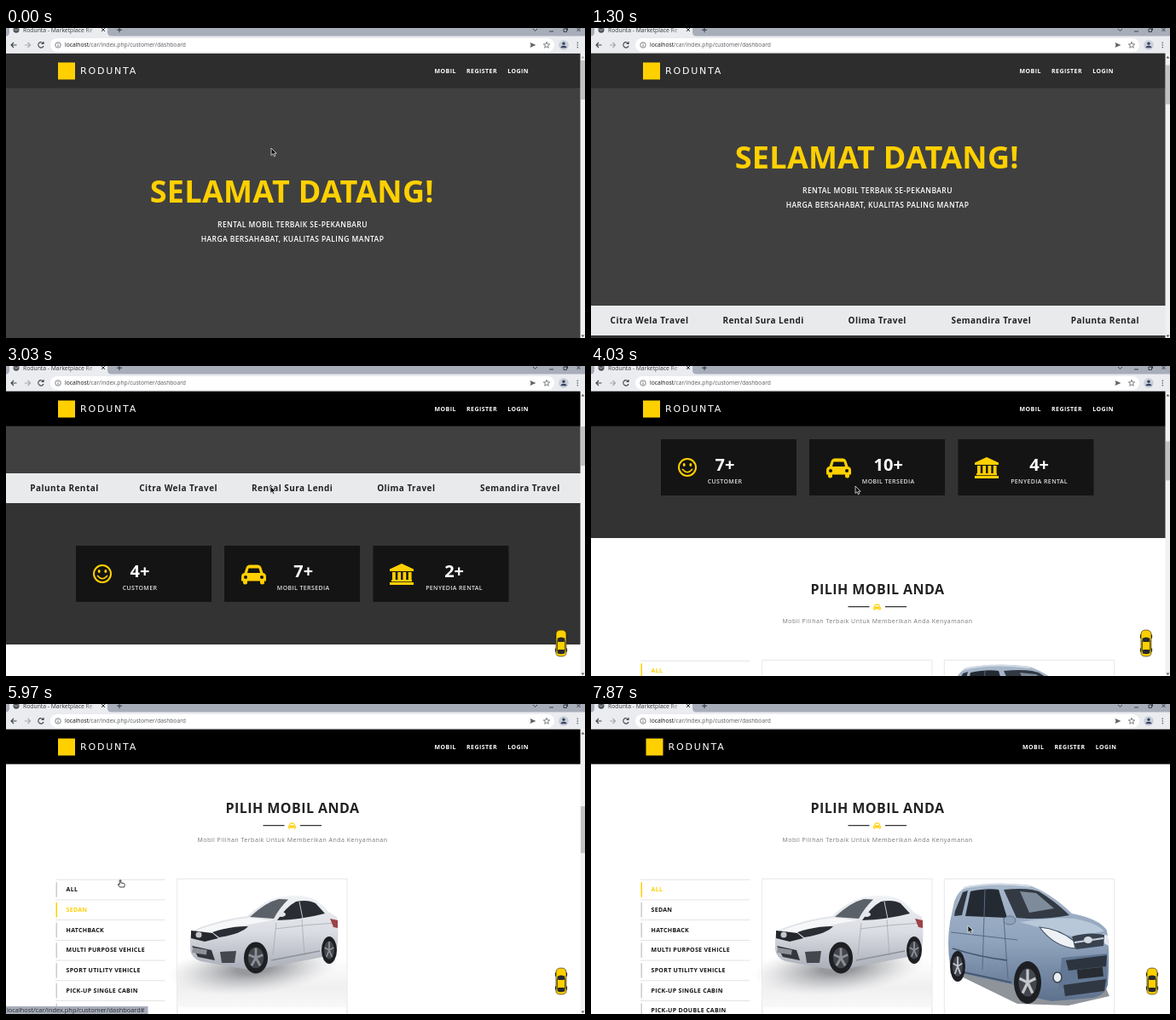
An HTML page that plays this animation: 679x364 px, repeating every 8 s.

```html
<!DOCTYPE html>
<html lang="id">
<head>
<meta charset="utf-8">
<title>Rodunta</title>
<style>
html, body { margin: 0; width: 100%; height: 100%; overflow: hidden; background: #fff; }
svg { display: block; width: 100vw; height: 100vh; }
text { font-family: "Open Sans", "Noto Sans", sans-serif; white-space: pre; }
</style>
</head>
<body>
<svg id="stage" viewBox="0 0 679 364" xmlns="http://www.w3.org/2000/svg"></svg>
<script>
const LOOP = 8000;
const YELLOW = '#ffd000';
const BRAND = 'Rodunta';
const agents = ['Citra Wela Travel', 'Rental Sura Lendi', 'Olima Travel', 'Semandira Travel', 'Palunta Rental'];
const types = ['ALL', 'SEDAN', 'HATCHBACK', 'MULTI PURPOSE VEHICLE', 'SPORT UTILITY VEHICLE', 'PICK-UP SINGLE CABIN', 'PICK-UP DOUBLE CABIN'];
const links = ['', 'localhost/car/index.php/customer/dashboard#',
  'localhost/.../honda-city-generasi-kelima-bermesin-turbo-meng...'];
const PITCH = 133.6;
const ROW = 23.72;

const steps = [
  [0, { scroll: 0, x: 311, y: 141, cursor: 'arrow', head: .3, strip: 0, counts: [0, 0, 0], up: 0,
        thumb: null, mpv: 1, active: 0, link: 0, hover: 0, box: 0, bar: 1 }],
  [800, { x: 310.5 }],
  [930, { x: 310 }],
  [1070, { scroll: 4 }],
  [1130, { scroll: 14 }],
  [1170, { scroll: 25 }],
  [1230, { scroll: 35, cursor: 'beam' }],
  [1300, { scroll: 40 }],
  [2370, { scroll: 137, head: 1, strip: 100, cursor: 'arrow' }],
  [2600, { scroll: 208, strip: PITCH, counts: [3, 4, 1] }],
  [2870, { counts: [3, 6, 2], up: 1 }],
  [3030, { scroll: 240, counts: [4, 7, 2] }],
  [3300, { scroll: 265, counts: [5, 8, 3] }],
  [3570, { strip: PITCH + 6, counts: [6, 9, 3] }],
  [3770, { strip: 2 * PITCH - 2 }],
  [4030, { scroll: 365, strip: 2 * PITCH, counts: [7, 10, 4] }],
  [4230, { scroll: 371 }],
  [4430, { scroll: 430 }],
  [4630, { scroll: 498 }],
  [4830, { scroll: 505 }],
  [5070, { x: 199, y: 224 }],
  [5370, { x: 137, y: 231, cursor: 'hand' }],
  [5630, { x: 135, y: 233, active: 1, link: 1, mpv: .5, thumb: [116, 52] }],
  [5970, { x: 134, y: 207, mpv: 0, thumb: [120, 55] }],
  [6200, { y: 209, mpv: .28, thumb: null }],
  [6500, { x: 142, y: 213, mpv: .9, active: 0 }],
  [6730, { x: 302, y: 258, cursor: 'arrow', mpv: 1, link: 2, hover: .3 }],
  [6930, { x: 310, y: 260, hover: .5 }],
  [7470, { box: 1, bar: 0, link: 0, hover: 0 }],
  [7870, { x: 442, box: 0 }]
];

const rect = (x, y, w, h, fill, more = '') =>
  `<rect x="${x}" y="${y}" width="${w}" height="${h}" fill="${fill}" ${more}/>`;
const path = (d, fill, more = '') => `<path d="${d}" fill="${fill}" ${more}/>`;
const line = (d, color, width, more = '') =>
  `<path d="${d}" fill="none" stroke="${color}" stroke-width="${width}" ${more}/>`;
const oval = (x, y, rx, ry, fill, more = '') =>
  `<ellipse cx="${x}" cy="${y}" rx="${rx}" ry="${ry}" fill="${fill}" ${more}/>`;
const text = (x, y, str, size, fill, { w = 400, ls = 0, mid = 0, more = '' } = {}) =>
  `<text x="${x}" y="${y}" font-size="${size}" fill="${fill}" font-weight="${w}" letter-spacing="${ls}"
    ${mid ? 'text-anchor="middle"' : ''} ${more}>${str}</text>`;
const group = (id, body, more = '') => `<g id="${id}" ${more}>${body}</g>`;
const fade = (id, stops, axis = 'x2="0" y2="1"', kind = 'linear') => `<${kind}Gradient id="${id}" ${axis}>`
  + stops.map(([at, color, alpha = 1]) => `<stop offset="${at}" stop-color="${color}" stop-opacity="${alpha}"/>`).join('')
  + `</${kind}Gradient>`;

function wheel(x, y, rx, ry, rim) {
  let spokes = '';
  for (let i = 0; i < 5; i++) {
    const a = i * Math.PI * .4 - Math.PI / 2;
    spokes += `M${x} ${y}L${x + Math.cos(a) * rx * .62} ${y + Math.sin(a) * ry * .62}`;
  }
  return oval(x, y, rx, ry, '#1d1f23') + oval(x, y, rx * .66, ry * .66, '#43464c') + line(spokes, rim, rx * .2);
}

const carIcon = path('M-14.5 3Q-14.5-1-11-1.500L-9-7.500Q-8-11-4.500-11H4.500Q8-11 9-7.500L11-1.500Q14.500-1 14.500 3V8H12.500V9.500Q12.500 12 10 12T7.500 9.500V8H-7.500V9.500Q-7.500 12-10 12T-12.500 9.500V8H-14.500ZM-7.500-1.500H7.500L6-7H-6ZM-11.500 3.500a2 2 0 1 0 4 0a2 2 0 1 0-4 0M7.500 3.500a2 2 0 1 0 4 0a2 2 0 1 0-4 0', YELLOW, 'fill-rule="evenodd"');

// Car photos, placed as they stand once the page rests at 505.
const sedan = rect(201, 206, 198.5, 150, 'url(#floor)')
  + oval(290, 311, 100, 30, 'url(#shadow)', 'transform="rotate(-5 290 311)"')
  + path('M216 272Q218 265 232 261Q257 252 283 249Q302 231 318 227Q340 223 356 227Q368 231 378 244L388 250Q391 268 388 288L377 296 309 309Q290 314 272 310L228 302Q217 298 216 288Z', 'url(#silver)')
  + path('M222 266Q254 254 285 251L312 254Q275 260 244 269Z', '#f6f7f9')
  + path('M286 250Q304 233 320 229L331 229.500Q321 239 314 252Z', '#5a6169')
  + path('M318 254Q329 238 340 232Q354 229 363 234L374 246Q347 253 318 254Z', '#2a2e34')
  + line('M344 232L348 252', '#c5c8ce', 1)
  + line('M316 264Q350 259 388 257M347 253L350 296M317 257L313 295', '#a6aab3', .8)
  + line('M311 301L368 290', '#8d9199', 1.600)
  + path('M242 268Q262 261 284 261Q276 270 250 274Z', '#2a2d33')
  + path('M217 266L242 269 249 275 233 279 217 275Z', '#24272c')
  + path('M218 284L241 289 245 301 225 297Z', '#33363c')
  + path('M251 291L270 290 268 304 253 304Z', '#44474d')
  + rect(219, 286, 17, 6, '#8e9298', 'transform="rotate(9 219 286)"')
  + oval(226, 271, 3.500, 3.500, '#c3c6ca')
  + path('M380 252L389 254 389 263 384 262Z', '#9b4348')
  + oval(323, 247, 5, 3, '#e3e5e9')
  + wheel(293, 298, 14, 18.500, '#8d9097') + wheel(379, 289, 9, 16, '#8d9097');

const mpv = rect(415, 206, 198, 151, '#fff')
  + path('M424 315L500 352 560 354 608 343 600 325 430 300Z', '#8f949b')
  + path('M421 256L426 232Q430 219 442 214Q478 208 514 213Q538 221 564 246Q596 252 605 266Q609 290 606 330Q602 343 588 345L540 349 522 345 493 329 437 317 421 306Q417 280 421 256Z', 'url(#blue)')
  + path('M484 218Q510 215 525 220Q545 232 561 248Q530 254 499 251Z', '#333a44')
  + path('M503 220L522 222 543 240 514 245Z', '#7d8b9b')
  + path('M445 220Q464 216 478 218L488 251 439 249Z', '#242a32')
  + path('M427 243L436 221 442 219 435 248 426 249Z', '#2e353e')
  + line('M437 216Q470 208 515 214', '#d3dbe5', 2)
  + line('M462 218L459 312M484 251L489 323M422 268L500 277', '#566a86', 1)
  + line('M424 287Q455 297 488 301M437 315L493 327', '#465870', 1.800)
  + path('M503 256Q540 250 566 252Q594 257 602 267L565 273Q538 266 503 256Z', '#b9c8d9')
  + path('M526 262Q549 264 566 278L568 287Q543 285 526 262Z', '#eef2f6', 'stroke="#465364" stroke-width="1.200"')
  + path('M600 270L606 272 607 284 602 281Z', '#e4eaf0')
  + path('M564 273Q584 267 602 271L601 284 569 288Z', '#39424f')
  + line('M567 280L601 275', '#c9d3de', 1.800)
  + oval(583, 277, 5, 4, '#d5dae0')
  + path('M552 298L605 293 605 327 548 335Z', '#627793')
  + path('M557 301L605 295 604 308 560 313Z', '#2c343f')
  + path('M554 330L604 323 602 337 556 343Z', '#2f3843')
  + rect(570, 312, 30, 11, '#272c33', 'transform="rotate(-6 570 312)"')
  + oval(547, 321, 5, 6, '#e8edf2', 'stroke="#3c4755" stroke-width="1.500"')
  + oval(491, 254, 7, 5, '#8da1bb', 'stroke="#536781" stroke-width=".8"')
  + wheel(512, 327, 16, 25, '#c2c6cc') + wheel(430, 308, 9, 18, '#c2c6cc');

const stat = (x, label, i, cx, icon) => rect(x, 451, 159, 66, '#141414') + icon
  + text(cx, 487.5, '', 20, '#fff', { w: 700, mid: 1, more: `id="count${i}"` })
  + text(cx, 502.5, label, 7, '#ddd', { w: 600, ls: .38, mid: 1 });

const smile = `<circle cx="113" cy="484" r="10" fill="none" stroke="${YELLOW}" stroke-width="2"/>`
  + oval(109.2, 481, 1.500, 1.900, YELLOW) + oval(116.8, 481, 1.500, 1.900, YELLOW)
  + line('M107.500 486.500Q113 493 118.500 486.500', YELLOW, 1.700, 'stroke-linecap="round"');
const bank = path('M464 472L478 478.500V481H450V478.500ZM450 494H478V497H450ZM452 491H476V493.200H452Z', YELLOW)
  + [453, 459.3, 465.500, 471.800].map(x => rect(x, 482, 3.800, 9, YELLOW)).join('');

const hero = rect(0, 30, 679, 337, '#404040')
  + text(335.3, 205, 'SELAMAT DATANG!', 36, YELLOW, { w: 700, ls: .3, mid: 1 })
  + text(336, 234, 'RENTAL MOBIL TERBAIK SE-PEKANBARU', 8.5, '#fff', { w: 600, ls: .42, mid: 1 })
  + text(336, 251, 'HARGA BERSAHABAT, KUALITAS PALING MANTAP', 8.5, '#fff', { w: 600, ls: .42, mid: 1 });

let names = '';
for (let i = -3; i < 6; i++)
  names += text(68.5 + PITCH * i, 387, agents[(i + 10) % 5], 10, '#222', { w: 700, ls: .45, mid: 1 });

const stats = rect(0, 401, 679, 166, '#333')
  + stat(82, 'CUSTOMER', 0, 157, smile)
  + stat(256, 'MOBIL TERSEDIA', 1, 348.7, `<g transform="translate(290.500 484.500)">${carIcon}</g>`)
  + stat(430.5, 'PENYEDIA RENTAL', 2, 525.6, bank);

const heading = text(336, 632.7, 'PILIH MOBIL ANDA', 16, '#222', { w: 700, ls: .45, mid: 1 })
  + line('M301.500 647.700H326.500M345 647.700H370', '#333', 1.2)
  + `<g transform="translate(335.500 648) scale(.32)">${carIcon}</g>`
  + text(336, 666.7, 'Mobil Pilihan Terbaik Untuk Memberikan Anda Kenyamanan', 7, '#777', { ls: .5, mid: 1 });

const menu = types.map((name, i) => {
  const y = 710.8 + ROW * i;
  return rect(58, y, 128.500, .8, '#ddd') + rect(58.5, y + 3.500, 1.5, 17.500, '#ccc', `id="mark${i}"`)
    + text(70.5, y + 14.300, name, 7, '#111', { w: 700, ls: .3, more: `id="type${i}"` });
}).join('');

const frame = x => rect(x, 710.5, 199, 240, '#fff', 'stroke="#ebebeb" stroke-width="1.500"');
const lens = `<circle cx="299" cy="785.500" r="3" fill="none" stroke="#fff" stroke-width="1.500"/>`
  + line('M301.300 788L303.800 790.500', '#fff', 1.8) + line('M297.500 785.500H300.500M299 784V787', '#fff', .7);

const page = hero + rect(0, 366, 679, 35, '#e9eaec') + group('strip', names) + stats
  + rect(0, 567, 679, 700, '#fff') + heading + menu
  + frame(200.8) + '<use href="#sedan" y="505"/>'
  + group('hover', rect(201, 711, 199, 150, '#000', 'id="shade"') + lens)
  + group('mpv', frame(414.500) + `<g transform="translate(0 505)">${mpv}</g>`);

const nav = (x, label) => text(x, 53.2, label, 7, '#fff', { w: 700, ls: .45 });
const header = rect(-10, 29, 700, 41.600, '#000', 'id="headBg"')
  + rect(61, 40.5, 20, 20, YELLOW)
  + text(87, 54.3, BRAND.toUpperCase(), 11, '#fff', { ls: 1.8, more: 'style="font-family:\'DejaVu Sans\',sans-serif"' })
  + nav(502.5, 'MOBIL') + nav(540, 'REGISTER') + nav(588.3, 'LOGIN');

const topCar = rect(643.9, 315, 14.2, 5, '#222', 'rx="1.500"') + rect(643.9, 331, 14.2, 5, '#222', 'rx="1.500"')
  + path('M645 315Q645 310 651 310T657 315V337Q657 341 651 341T645 337Z', YELLOW, 'stroke="#3a3210" stroke-width=".7"')
  + path('M646.300 320Q651 317 655.700 320L654.500 324H647.500Z', '#26282c')
  + path('M647.500 333H654.500L655.700 337Q651 339.500 646.300 337Z', '#26282c')
  + line('M646.300 322V335M655.700 322V335', '#26282c', .9);

const bar = rect(673.5, 29, 6, 335, '#f1f1f1') + rect(674, 38, 5, 46, '#c1c1c1', 'id="thumb"')
  + path('M674.600 35.500H678.400L676.300 33Z', '#505050', 'id="arrowUp"') + path('M674.600 360.500H678.400L676.300 363Z', '#505050');

const lightbox = rect(0, 29, 679, 335, '#0b0b0b', 'opacity=".8"')
  + '<use href="#sedan" transform="translate(339.500 197) scale(1.800) translate(-300.250 -281)"/>'
  + line('M508 53L514 59M514 53L508 59', '#333', 1.2);

const TOOLBAR = '#eaecef';
const chrome = rect(0, 0, 679, 12, '#a8adba') + rect(0, 9.5, 679, 20.200, TOOLBAR)
  + path('M0 10Q4 9 4 5V0H119V5Q119 9 123 10Z', TOOLBAR)
  + oval(12, 2, 3.500, 3.800, '#4d5156') + line('M9.500 1.500L12 3L14.500 1', '#c4c7cb', .8)
  + text(20, 4.8, BRAND + ' - Marketplace Re', 6.8, '#35383d')
  + rect(92, 0, 16, 8, 'url(#tabEnd)')
  + line('M112 0L116 4M116 0L112 4M130 2.200H136M133 -1V5.200', '#33363b', 1)
  + line('M618 1L620.500 3.500L623 1M637 4H642M654 1H657.500V4.500H654ZM655.500 0H658.500V3M669.500 0L673.500 4M673.500 0L669.500 4', '#33363b', .9)
  + rect(52, 12, 591, 16, '#fff', 'rx="8"')
  + line('M12.500 20H6M9 17L6 20L9 23', '#3f4348', 1.1)
  + line('M22 20H28.500M25.500 17L28.500 20L25.500 23', '#a5a8ad', 1.1)
  + line('M43.600 18A3.200 3.200 0 1 0 44 21M44 16V18.500H41.500', '#3f4348', 1.1)
  + '<circle cx="61" cy="20" r="3.200" fill="none" stroke="#5f6368" stroke-width=".8"/>'
  + line('M61 19.500V22M61 18V18.800', '#5f6368', .9)
  + text(69, 22.3, 'localhost<tspan fill="#55595e">/car/index.php/customer/dashboard</tspan>', 6.7, '#111')
  + path('M614.500 17L621.500 20L614.500 23L615.500 20Z', '#5f6368')
  + path('M634 16.300L635 18.900L637.700 19L635.600 20.700L636.300 23.300L634 21.800L631.700 23.300L632.400 20.700L630.300 19L633 18.900Z', 'none', 'stroke="#5f6368" stroke-width=".8"')
  + oval(654, 20, 5.800, 5.800, '#c9cedb') + oval(654, 18.300, 1.700, 1.700, '#39425e')
  + path('M650.500 23.300Q650.500 20.700 654 20.700T657.500 23.300Z', '#39425e')
  + [17.3, 20, 22.7].map(y => oval(670.3, y, .8, .8, '#4a4e53')).join('');

const pointers =
  path('M0 0V8.500L2 6.700L3.400 9.800L4.900 9.100L3.500 6.200H6.200Z', '#111', 'id="arrow" stroke="#fff" stroke-width=".7"')
  + line('M-.2 -2H1M1.800 -2H3M1.400 -1.500V6M-.2 6.500H1M1.800 6.500H3', '#262626', .8, 'id="beam"')
  + path('M-.8 0Q0 -.9 .8 0V3L4.500 3.800Q5.500 4.200 5.300 5.500L4.500 8H-.5L-2.800 4.800Q-2.500 3.800 -.8 5Z', '#fff', 'id="hand" stroke="#111" stroke-width=".8"');

const stage = document.getElementById('stage');
stage.innerHTML = '<defs>'
  + fade('floor', [[.6, '#fff'], [.85, '#f0f0f1'], [1, '#f8f8f8']])
  + fade('shadow', [[.2, '#77797e', .75], [.6, '#9a9ca0', .4], [1, '#c8c9cc', 0]], '', 'radial')
  + fade('silver', [[0, '#f0f2f5'], [.5, '#d9dce2'], [1, '#a9adb7']])
  + fade('blue', [[0, '#a9b8cb'], [.5, '#8fa3bd'], [1, '#5d718d']])
  + fade('tabEnd', [[0, TOOLBAR, 0], [1, TOOLBAR]], '')
  + `<g id="sedan">${sedan}</g></defs>`
  + group('page', page) + group('header', header) + group('up', topCar) + group('bar', bar)
  + group('lightbox', lightbox)
  + group('status', rect(0, 355, 166, 9, '#a8adba', 'id="statusBg"') + text(1, 362, '', 7.4, '#24272c', { more: 'id="link"' }))
  + chrome + group('cursor', pointers);

const el = {};
stage.querySelectorAll('[id]').forEach(node => el[node.id] = node);
const set = (id, attrs) => { for (const k in attrs) el[id].setAttribute(k, attrs[k]); };
const show = (id, on) => set(id, { visibility: on ? 'visible' : 'hidden' });
const move = (id, x, y) => set(id, { transform: `translate(${x} ${y})` });

function draw(t) {
  const s = Object.assign({}, ...steps.filter(step => step[0] <= t).map(step => step[1]));
  move('page', 0, -s.scroll);
  move('strip', s.strip, 0);
  move('header', s.bar ? 0 : 3.5, 0);
  set('headBg', { opacity: s.head });
  s.counts.forEach((n, i) => el['count' + i].textContent = n + '+');

  types.forEach((_, i) => {
    set('type' + i, { fill: i === s.active ? YELLOW : '#111' });
    set('mark' + i, { fill: i === s.active ? YELLOW : '#ccc' });
  });
  set('mpv', { transform: `translate(514 786) scale(${s.mpv}) translate(-514 -786)`, opacity: s.mpv });
  set('shade', { opacity: s.hover });
  set('hover', { opacity: s.hover ? 1 : 0 });

  set('up', { opacity: s.up });
  move('up', s.bar ? 0 : 7, 0);
  const [top, size] = s.thumb || [38 + s.scroll * .138, 46];
  set('thumb', { y: top, height: size });
  set('arrowUp', { opacity: s.scroll ? 1 : .45 });
  show('bar', s.bar);

  show('lightbox', s.box);
  show('status', s.link);
  set('statusBg', { width: s.link === 2 ? 224.5 : 166.5 });
  el.link.textContent = links[s.link];

  move('cursor', s.x, s.y);
  for (const kind of ['arrow', 'beam', 'hand']) show(kind, kind === s.cursor);
}

const start = performance.now();
function tick() {
  draw((performance.now() - start) % LOOP);
  requestAnimationFrame(tick);
}
tick();
</script>
</body>
</html>
```
